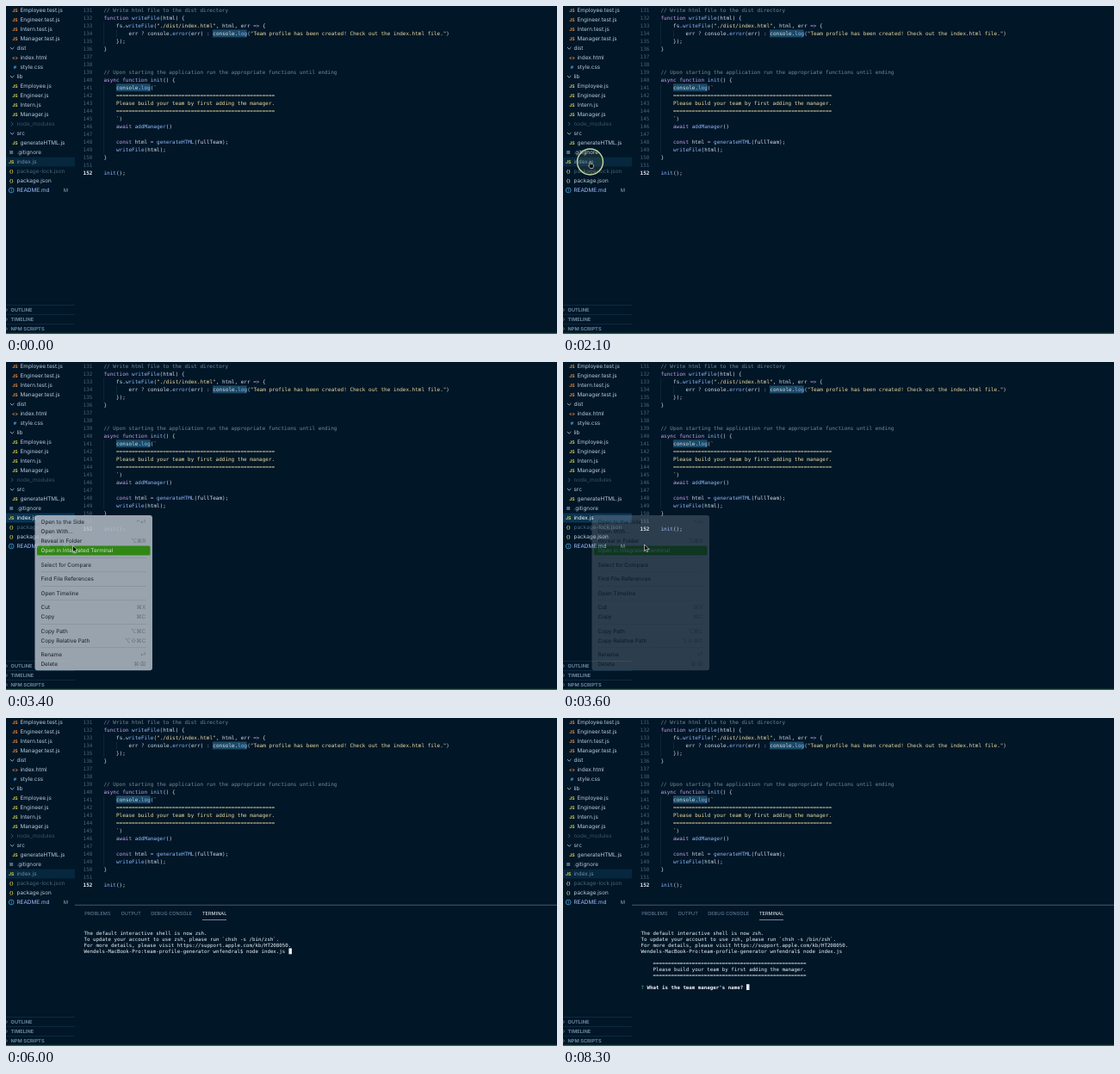
These frames come from a looping animation (640 by 381 pixels, 8600 ms). An HTML page:

```html
<!DOCTYPE html>
<html lang="en">
<head>
<meta charset="utf-8">
<title>Editor and terminal</title>
<style>
  html, body { margin: 0; width: 100%; height: 100%; overflow: hidden; background: #011627; }
  svg { display: block; width: 100%; height: 100%; }
  text { white-space: pre; text-rendering: geometricPrecision; font: 6.4px Inter, "DejaVu Sans", sans-serif; fill: #b9cad9; }
  .code text { font: 6px "DejaVu Sans Mono", monospace; fill: #d6deeb; }
  .code .number { fill: #4b6479; text-anchor: end; }
  .code .current { fill: #e4edf5; font-weight: bold; }
  .shell text { font: 5.814px "DejaVu Sans Mono", monospace; fill: #f0f4f8; }
  .caps { font-size: 5.6px; fill: #6b869d; }
  .section { font-size: 5.7px; font-weight: bold; fill: #6b869d; }
  .icon { font-size: 5.2px; font-weight: bold; }
  .menu text { fill: #1c2229; }
  .menu .keys { fill: #757e88; text-anchor: end; }
  .menu .chosen { fill: #fff; }
  .line { fill: none; stroke-width: .8; }
</style>
</head>
<body>
<svg id="stage" viewBox="0 0 640 381" preserveAspectRatio="none"></svg>
<script>
const LOOP = 8600;
const stage = document.getElementById("stage");

function add(parent, tag, attrs = {}, content = "") {
  const el = document.createElementNS("http://www.w3.org/2000/svg", tag);
  for (const key in attrs) el.setAttribute(key, attrs[key]);
  el.textContent = content;
  parent.append(el);
  return el;
}
const group = name => add(stage, "g", { class: name });
const rect = (parent, x, y, width, height, fill, rx = 0) =>
  add(parent, "rect", { x, y, width, height, fill, rx });
const label = (parent, x, y, content, attrs = {}) => add(parent, "text", { x, y, ...attrs }, content);
const path = (parent, d, stroke) => add(parent, "path", { d, stroke, class: "line" });
const show = (el, on) => el.setAttribute("visibility", on ? "visible" : "hidden");

// ---- Sidebar ----
const sidebar = group("sidebar");
const DIM = "#4a6478", ORANGE = "#ef8a3c", YELLOW = "#d9cf4e", BLUE = "#4aa3d8";
const tree = [
  ["Employee.test.js", "JS", ORANGE, 1], ["Engineer.test.js", "JS", ORANGE, 1],
  ["Intern.test.js", "JS", ORANGE, 1], ["Manager.test.js", "JS", ORANGE, 1],
  ["dist", "open"], ["index.html", "<>", ORANGE, 1], ["style.css", "#", BLUE, 1],
  ["lib", "open"], ["Employee.js", "JS", YELLOW, 1], ["Engineer.js", "JS", YELLOW, 1],
  ["Intern.js", "JS", YELLOW, 1], ["Manager.js", "JS", YELLOW, 1],
  ["node_modules", "closed", "", 0, "#3b5468"],
  ["src", "open"], ["generateHTML.js", "JS", YELLOW, 1],
  [".gitignore", "dot"], ["index.js", "JS", YELLOW, 0, "#6f8da6"],
  ["package-lock.json", "{}", YELLOW, 0, DIM], ["package.json", "{}", YELLOW],
  ["README.md", "info", BLUE, 0, "#a2bffc"],
];
const selectedRow = rect(sidebar, 0, 175.6, 80, 10.9, "#06273d");
let selectedName;

tree.forEach(([name, icon, color, nested = 0, fill = "#b9cad9"], row) => {
  const y = 5 + row * 11, x = nested ? 10.5 : 6.2;
  const text = label(sidebar, nested ? 16.5 : 12.5, y + 2.4, name, { style: `fill:${fill}` });
  if (name === "index.js") selectedName = text;
  if (icon === "open") path(sidebar, `M5 ${y - 1}l2.2 2.2 2.2-2.2`, "#b9cad9");
  else if (icon === "closed") path(sidebar, `M6 ${y - 2.2}l2.2 2.2-2.2 2.2`, DIM);
  else if (icon === "dot") rect(sidebar, 4.2, y - 2, 4, 4, "#526a7c");
  else if (icon === "info") {
    add(sidebar, "circle", { cx: x, cy: y, r: 2.9, class: "line", stroke: color });
    rect(sidebar, x - .4, y - .5, .8, 2, color);
    rect(sidebar, x - .4, y - 1.7, .8, .8, color);
  } else label(sidebar, x, y + 1.9, icon, { class: "icon", style: `fill:${color}`, "text-anchor": "middle" });
});
label(sidebar, 66.8, 216.3, "M", { style: "fill:#8fa9cf;font-size:5.8px" });

["OUTLINE", "TIMELINE", "NPM SCRIPTS"].forEach((name, i) => {
  const y = 353 + i * 11;
  rect(sidebar, 0, y - 6, 80, .7, "#123349");
  path(sidebar, `M-.4 ${y - 2}l2 2-2 2`, "#6b869d");
  label(sidebar, 5.5, y + 2.1, name, { class: "section" });
});

// ---- Code ----
const code = group("code");
const RULE = "=".repeat(51);
const PITCH = 8.975, COL = 3.612, CODE_X = 113.5;
const lineY = n => 5 + (n - 131) * PITCH;
const source = [
  "// Write html file to the dist directory",
  "function writeFile(html) {",
  '    fs.writeFile("./dist/index.html", html, err => {',
  '        err ? console.error(err) : console.log("Team profile has been created! Check out the index.html file.")',
  "    });",
  "}", "", "",
  "// Upon starting the application run the appropriate functions until ending",
  "async function init() {",
  "    console.log(`",
  "    " + RULE,
  "    Please build your team by first adding the manager.",
  "    " + RULE,
  "    `)",
  "    await addManager()",
  "",
  "    const html = generateHTML(fullTeam);",
  "    writeFile(html);",
  "}", "",
  "init();",
];
const syntax = /(\/\/.*)|("[^"]*"|`[^`]*`)|(\b(?:function|async|await|const)\b|=>|[?:=])|(\w+(?=\())|[^]/g;
const tokenColors = ["#788b95", "#f0dca0", "#c9a0ee", "#93b8fb"];

for (const [x, from, to] of [[CODE_X, 133, 135], [CODE_X, 141, 149], [128, 134, 134]])
  rect(code, x, lineY(from) - 4.5, .6, (to - from + 1) * PITCH, "#14344a");
rect(code, CODE_X + 35 * COL, lineY(134) - 4.4, 11 * COL, 8.8, "#1c4a66");
rect(code, CODE_X + 4 * COL, lineY(141) - 4.4, 11 * COL, 8.8, "#1c4a66");

const codeRows = source.map((_, i) => {
  const y = lineY(131 + i) + 2.1;
  label(code, 100.4, y, 131 + i, { class: i === 21 ? "number current" : "number" });
  return label(code, CODE_X, y, "");
});
let rowIndex = 0;
for (const match of source.join("\n").matchAll(syntax)) {
  const kind = match.slice(1).findIndex(Boolean);
  match[0].split("\n").forEach((part, i) => {
    if (i) rowIndex++;
    if (part) add(codeRows[rowIndex], "tspan", kind < 0 ? {} : { fill: tokenColors[kind] }, part);
  });
}

// ---- Terminal ----
const shell = group("shell");
rect(shell, 80, 217, 560, 163, "#011627");
rect(shell, 80, 216.8, 560, .9, "#47627a");
const panel = group("panel");
[["PROBLEMS", 91.2], ["OUTPUT", 133.5], ["DEBUG CONSOLE", 168.2], ["TERMINAL", 228]].forEach(([name, x], i) =>
  label(panel, x, 229, name, { class: "caps", style: i === 3 ? "fill:#eef3f8" : "" }));
rect(panel, 228, 234.2, 28, .8, "#8fa9bd");

const SHELL_X = 90.5, SHELL_COL = 3.5;
const shellY = n => 243.1 + n * 6.95;
const shellRows = Array.from({ length: 11 }, (_, n) => label(shell, SHELL_X, shellY(n) + 2.1, ""));
const block = rect(shell, 0, 0, 3.5, 6.8, "#e4ebf1");

const welcome = [
  "",
  "The default interactive shell is now zsh.",
  "To update your account to use zsh, please run `chsh -s /bin/zsh`.",
  "For more details, please visit https://support.apple.com/kb/HT208050.",
];
const prompt = "Wendels-MacBook-Pro:team-profile-generator wnfendral$ ";
const command = "node index.js ";
const output = [
  "", "    " + RULE, "    Please build your team by first adding the manager.", "    " + RULE, "",
  `<tspan style="fill:#3fd67c">?</tspan> <tspan font-weight="bold">What is the team manager's name?</tspan> `,
];

// The first seven letters are typed; the rest is completed at once.
function typed(t) {
  if (t < 5000) return "";
  return t < 5800 ? command.slice(0, Math.min(7, Math.floor((t - 5000) / 100) + 1)) : command;
}
function shellLines(t) {
  if (t < 4200) return [""];
  const lines = [...welcome, t < 4400 ? "" : prompt + typed(t)];
  if (t >= 7700) return lines.concat(output);
  return t >= 7200 ? lines.concat("") : lines;
}
let shown = "";
function drawShell(t) {
  const lines = shellLines(t), key = lines.join("\n") + lines.length;
  if (key === shown) return;
  shown = key;
  shellRows.forEach((row, i) => row.innerHTML = lines[i] || "");
  const last = lines.length - 1;
  block.setAttribute("x", SHELL_X + shellRows[last].textContent.length * SHELL_COL);
  block.setAttribute("y", shellY(last) - 3.4);
}

// ---- Context menu ----
const menu = group("menu");
rect(menu, 33.5, 178, 136.5, 180.3, "#b5bdc7", 3);
rect(menu, 36, 213.6, 131.5, 10.9, "#399c10", 1.5);
const items = [
  ["Open to the Side", "⌃⏎"], ["Open With..."], ["Reveal in Folder", "⌥⌘R"], ["Open in Integrated Terminal"], null,
  ["Select for Compare"], null, ["Find File References"], null, ["Open Timeline"], null,
  ["Cut", "⌘X"], ["Copy", "⌘C"], null,
  ["Copy Path", "⌥⌘C"], ["Copy Relative Path", "⌥⇧⌘C"], null,
  ["Rename", "⏎"], ["Delete", "⌘⌫"],
];
let itemY = 186;
items.forEach((item, i) => {
  if (!item) {
    rect(menu, 40.5, itemY - 3, 122.5, .6, "#98a1ab");
    itemY += 5.5;
    return;
  }
  label(menu, 40.5, itemY + 2.3, item[0], { class: i === 3 ? "chosen" : "" });
  if (item[1]) label(menu, 162.3, itemY + 2.3, item[1], { class: "keys" });
  itemY += 11;
});

// ---- Pointer ----
const ring = add(stage, "circle", { r: 15, fill: "#c8dca0", "fill-opacity": .1, stroke: "#c3d9a0", "stroke-width": 1.4 });
const pointer = group("pointer");
const outlined = { fill: "#000", stroke: "#fff", "stroke-width": .6, "stroke-linejoin": "round" };
const shapes = {
  arrow: add(pointer, "path", { ...outlined, d: "M0 0V7.6L1.8 6 3 8.7 4.3 8.1 3.1 5.5H5.5Z" }),
  hand: add(pointer, "path", { ...outlined, d: "M-.6 .4Q0-.4.6 .4V3L3.4 3.6Q4.3 4 4 5.2L3.3 8H.1L-2 5Q-1.9 4-.6 4.8Z" }),
  beam: add(pointer, "path", { fill: "none", stroke: "#fff", "stroke-width": .9, d: "M-1.6-4Q0-4 0-3 0-4 1.6-4M0-3V3M-1.6 4Q0 4 0 3 0 4 1.6 4" }),
};
const moves = [
  [1300, 100, 228], [1850, 31.5, 180.5], [2250, 31.5, 180.5], [2700, 66.5, 214],
  [3250, 66.5, 214], [3600, 94.5, 212], [4300, 128, 209.5], [5000, 128, 209.5],
];
function pointerAt(t) {
  const next = Math.max(1, moves.findIndex(([time]) => time > t));
  const [t0, x0, y0] = moves[next - 1], [t1, x1, y1] = moves[next];
  const p = Math.min(1, Math.max(0, (t - t0) / (t1 - t0)));
  const ease = p * p * (3 - 2 * p);
  return [x0 + (x1 - x0) * ease, y0 + (y1 - y0) * ease];
}

rect(stage, 0, 379.8, 640, 1.2, "#14860f");

function draw(t) {
  const menuOpen = t >= 2300 && t < 3680;
  const focused = t >= 2300 && t < 3800;
  show(shell, t >= 3800);
  show(panel, t >= 3800);
  drawShell(t);

  show(menu, menuOpen);
  menu.setAttribute("opacity", Math.min(1, Math.max(0, (3680 - t) / 330)));
  selectedRow.setAttribute("fill", focused ? "#0b3551" : "#06273d");
  selectedName.style.fill = focused ? "#fff" : "#6f8da6";

  const visible = t >= 1300 && t < 5000;
  show(pointer, visible);
  const [x, y] = visible ? pointerAt(t) : [0, 0];
  pointer.setAttribute("transform", `translate(${x} ${y})`);
  const shape = menuOpen ? "arrow" : x < 80 ? "hand" : "beam";
  for (const name in shapes) shapes[name].setAttribute("display", name === shape ? "inline" : "none");

  show(ring, (t >= 2000 && t < 2300) || (t >= 3100 && t < 3300));
  ring.setAttribute("cx", x);
  ring.setAttribute("cy", y + .5);
}

const start = performance.now();
function frame() {
  draw((performance.now() - start) % LOOP);
  requestAnimationFrame(frame);
}
frame();
</script>
</body>
</html>
```
